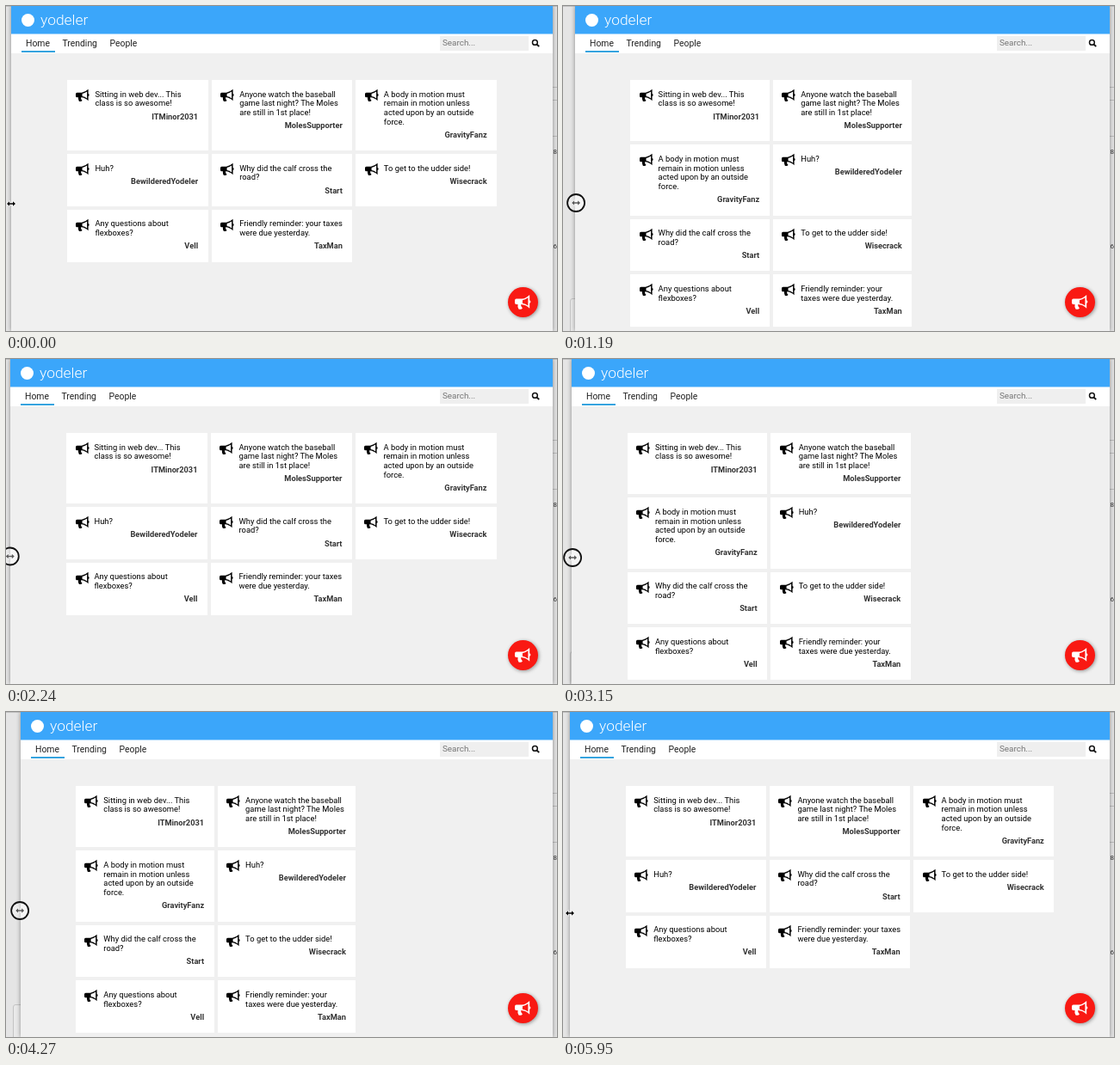
An HTML page for the animation above (6.02 s loop, 640 by 378 pixels).

```html
<!DOCTYPE html>
<html lang="en">
<head>
<meta charset="utf-8">
<title>Resizing a card layout</title>
<style>
html, body { margin: 0; width: 100%; height: 100%; overflow: hidden; }
body { position: relative; background: #e5e5e5; font: 9.4px/10.7px Roboto, Arial, sans-serif; color: #000; }
body *, body { box-sizing: border-box; }
#stage { position: absolute; left: 0; top: 0; width: 640px; height: 378px; overflow: hidden; }
#stage > *, header *, nav *, .card svg { position: absolute; }
.panel { left: 8px; top: 340px; width: 40px; height: 60px; border: 1px solid #c4c4c4; border-radius: 3px; background: #e9e9e9; }
.edge { left: 635px; top: 0; width: 5px; height: 378px; background: #e2e2e2; }
.rule { left: 635px; width: 5px; height: 1px; background: #bbb; }
.digit { left: 635.5px; font-size: 8px; color: #333; }
#win { top: 0; right: 5px; height: 378px; background: #f0f0f0; box-shadow: 0 0 5px rgba(0, 0, 0, .42); }
header { position: absolute; z-index: 1; left: 0; right: 0; top: 0; height: 32px; background: #3ba6fa; box-shadow: 0 1px rgba(59, 166, 250, .5); color: #fff; }
header i { left: 12px; top: 8.5px; width: 15px; height: 15px; border-radius: 50%; background: #fff; }
header b { left: 34px; top: 6px; font-size: 17.4px; font-weight: 300; line-height: 20px; }
nav { position: absolute; left: 0; right: 0; top: 32px; height: 23px; background: #fff; font-size: 10.4px; color: #222; }
nav span { top: 6px; line-height: 12px; white-space: nowrap; }
nav u { left: 12px; top: 20px; width: 39px; height: 2px; background: #35a3df; }
nav .field { right: 28px; top: 3px; width: 103px; height: 17px; padding: 2.5px 3px; background: #efefef; color: #757575; font-size: 9.9px; }
nav svg { right: 14px; top: 6px; }
#list { position: absolute; left: 10%; right: 10%; top: 84px; display: grid; grid-template-columns: repeat(3, 33.333%); }
#list.two { grid-template-columns: repeat(2, 33.333%); }
.card { position: relative; margin: 2px; padding: 11.6px 11.5px 12.5px 32.5px; background: #fff; white-space: pre; }
.card svg { left: 10.5px; top: 10px; }
.card b { display: block; margin-top: 4.5px; text-align: right; font-size: 9.25px; color: #333; }
.wide, .tight .narrow { display: block; }
.narrow, .tight .wide { display: none; }
.fab { left: 583px; top: 327px; width: 35px; height: 35px; border-radius: 50%; background: #f91913; box-shadow: 1px 1px 4px rgba(0, 0, 0, .4); }
.fab svg { position: absolute; left: 7.5px; top: 7.5px; }
.top { left: 0; top: 0; width: 640px; height: 1px; background: rgba(90, 90, 90, .25); }
#cursor { left: -12px; top: -11px; }
</style>
</head>
<body>
<svg width="0" height="0" style="position:absolute">
  <symbol id="horn" viewBox="0 0 17 16">
    <path fill-rule="evenodd" d="M1.5 4.7H7Q11 4.3 14.6 .8V6A1.6 1.6 0 0 1 14.6 9V14.2Q11 10.5 6.1 10.2Q5.6 12.2 7.6 14Q6.4 15.6 3.8 14.8Q2.5 12.4 3 10.2H1.5Q0 10.2 0 8.7V6.2Q0 4.7 1.5 4.7ZM7.6 6Q10.7 5.5 13.1 3.6V11.4Q10.7 9.5 7.6 9Z"/>
  </symbol>
</svg>
<div id="stage">
  <div class="panel"></div>
  <div class="edge"></div>
  <div class="rule" style="top:94px"></div>
  <div class="rule" style="top:109px"></div>
  <div class="rule" style="top:151px"></div>
  <div class="digit" style="top:165px">8</div>
  <div class="digit" style="top:275px">6</div>
  <div id="win">
    <header><i></i><b>yodeler</b></header>
    <nav>
      <span style="left:17px">Home</span>
      <span style="left:59.5px">Trending</span>
      <span style="left:114.5px">People</span>
      <u></u>
      <div class="field">Search...</div>
      <svg width="11" height="11" fill="none" stroke="#111">
        <circle cx="4.4" cy="4.4" r="2.9" stroke-width="1.5"/>
        <path d="M6.6 6.6L9.2 9.2" stroke-width="1.9"/>
      </svg>
    </nav>
    <div id="list"></div>
  </div>
  <div class="fab"><svg width="20" height="19" fill="#fff"><use href="#horn"/></svg></div>
  <div class="top"></div>
  <svg id="cursor" width="24" height="24">
    <path d="M7 12L10 9.3V11.3H14V9.3L17 12L14 14.7V12.7H10V14.7Z" stroke="#fff" stroke-width="1.2" paint-order="stroke"/>
    <circle id="ring" cx="12" cy="12" r="10" fill="rgba(255,255,255,.35)" stroke="#111" stroke-width="1.8"/>
  </svg>
</div>
<script>
const LOOP = 6020, STEP = 70;
const $ = id => document.getElementById(id);

const posts = [
  ['Sitting in web dev... This\nclass is so awesome!', 'ITMinor2031'],
  ['Anyone watch the baseball\ngame last night? The Moles\nare still in 1st place!', 'MolesSupporter'],
  ['A body in motion must\nremain in motion unless\nacted upon by an outside\nforce.', 'GravityFanz'],
  ['Huh?', 'BewilderedYodeler'],
  ['Why did the calf cross the\nroad?', 'Start'],
  ['To get to the udder side!', 'Wisecrack'],
  ['Any questions about\nflexboxes?', 'Vell'],
  ['<span class="wide">Friendly reminder: your taxes\nwere due yesterday.</span>' +
   '<span class="narrow">Friendly reminder: your\ntaxes were due yesterday.</span>', 'TaxMan']
];
$('list').innerHTML = posts.map(([text, author]) =>
  `<div class="card"><svg width="17" height="16"><use href="#horn"/></svg><div>${text}</div><b>${author}</b></div>`
).join('');

// [time, position] keys of the dragged window edge and of the pointer height
const edge = [[0, 6], [420, 6], [1190, 14], [1440, 16.5], [1700, 12.5], [2240, 5], [2560, 4.5],
  [3150, 10], [3640, 16.5], [3950, 18.5], [4270, 17], [4830, 9], [5250, 5], [5740, 8], [6020, 8]];
const height = [[0, 229], [1190, 228], [2240, 228.5], [3150, 230], [4270, 230], [4830, 231], [5950, 233], [6020, 233]];

const clamp = v => Math.min(1, Math.max(0, v));
const slope = (a, b) => (b[1] - a[1]) / (b[0] - a[0]);

function tangent(keys, i) {
  if (i === 0 || i === keys.length - 1) return 0;
  const a = slope(keys[i - 1], keys[i]), b = slope(keys[i], keys[i + 1]);
  return a * b > 0 ? 2 * a * b / (a + b) : 0;
}

// Monotone cubic interpolation
function sample(keys, time) {
  const t = Math.min(time, LOOP - 1);
  const i = keys.findIndex(k => k[0] > t) - 1;
  const [t0, p0] = keys[i], [t1, p1] = keys[i + 1];
  const d = t1 - t0, u = (t - t0) / d, v = 1 - u;
  return v * v * (1 + 2 * u) * p0 + u * u * (3 - 2 * u) * p1
    + d * u * v * (v * tangent(keys, i) - u * tangent(keys, i + 1));
}

function draw(now) {
  const t = Math.floor(now % LOOP / STEP) * STEP;
  const x = sample(edge, t);
  $('win').style.left = x + 'px';
  // Columns wrap first, the longest line breaks one pixel later
  $('list').classList.toggle('two', x > 8.5);
  $('list').classList.toggle('tight', x > 9.5);
  // The window trails the pointer slightly
  $('cursor').style.transform = `translate(${sample(edge, t + 90)}px, ${sample(height, t)}px)`;
  $('ring').style.opacity = Math.min(clamp((t - 70) / 210), clamp((5810 - t) / 210));
}

const start = performance.now();
function tick() {
  draw(performance.now() - start);
  requestAnimationFrame(tick);
}
tick();
</script>
</body>
</html>
```
